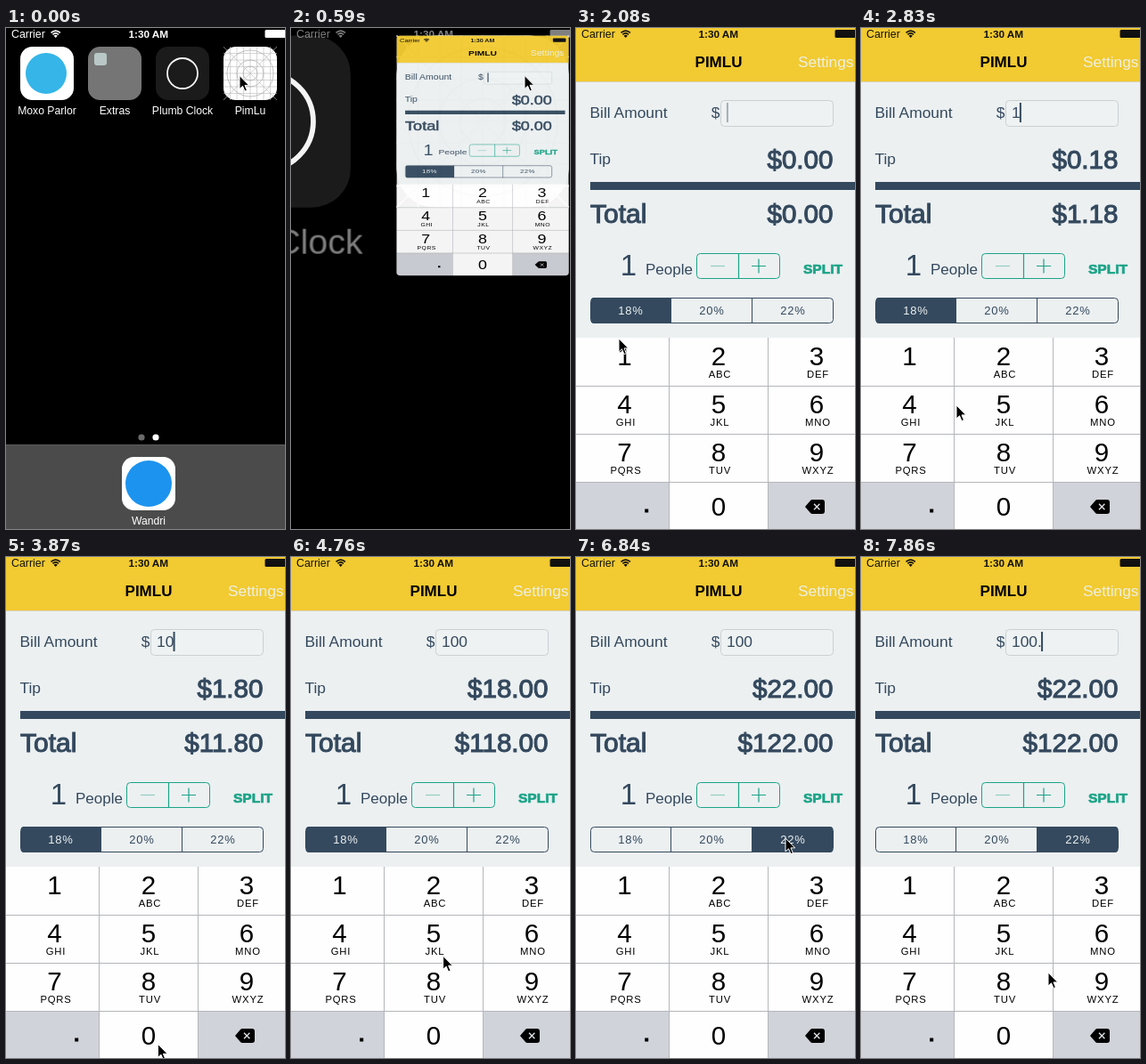
An HTML page that plays this animation: 313 by 563 pixels, repeating every 8 s.

```html
<!DOCTYPE html>
<html lang="en">
<head>
<meta charset="utf-8">
<title>Tip calculator</title>
<style>
  html, body { margin: 0; width: 100%; height: 100%; overflow: hidden; background: #000; }
  svg { display: block; width: 313px; height: 563px; font-family: "Liberation Sans", Arial, sans-serif; }
  text { white-space: pre; }
</style>
</head>
<body>
<svg id="stage" viewBox="0 0 313 563" xmlns="http://www.w3.org/2000/svg"></svg>
<script>
const LOOP = 8000, START = 440, TICK = 148.4;
const NAVY = '#34495e', TEAL = '#1ba387', PAPER = '#ecf0f1';
const APP = 'PimLu';
// The phone screen is slightly larger than the stage that crops it.
const SCREEN = { top: -4.5, w: 320, h: 568 };

// ---- drawing helpers ----
const attrs = o => Object.entries(o).map(([k, v]) => ` ${k}="${v}"`).join('');
const text = (x, y, size, s, o = {}) => `<text x="${x}" y="${y}" font-size="${size}"${attrs(o)}>${s}</text>`;
const centered = (x, y, size, s, o = {}) => text(x, y, size, s, { 'text-anchor': 'middle', ...o });
const rect = (x, y, w, h, fill, o = {}) =>
  `<rect x="${x}" y="${y}" width="${w}" height="${h}" fill="${fill}"${attrs(o)}/>`;
const circle = (x, y, r, fill, o = {}) => `<circle cx="${x}" cy="${y}" r="${r}" fill="${fill}"${attrs(o)}/>`;
const line = (d, stroke, width = 1, o = {}) =>
  `<path d="${d}" fill="none" stroke="${stroke}" stroke-width="${width}"${attrs(o)}/>`;

const statusBar = color => `<g fill="${color}">
  ${text(6, 11, 12.4, 'Carrier')}
  ${line('M50.5 5.4Q55.7 0.8 60.9 5.4M52.4 7.4Q55.7 4.4 59 7.4', color, 1.6)}
  <path d="M53.6 8.7Q55.7 7 57.8 8.7L55.7 11z"/>
  ${centered(159.8, 11, 11.8, '1:30 AM', { 'font-weight': 'bold' })}
  ${rect(290.5, 2, 24, 9, color, { rx: 1.5 })}</g>`;

// ---- home screen ----
const tile = (x, y, fill) => rect(x, y, 60, 60, fill, { rx: 13.5 });
const label = (x, y, s, o = {}) => centered(x, y, 12.2, s, { fill: '#fff', ...o });

function gridIcon() {
  let d = 'M244 21L304 81M304 21L244 81';
  for (let i = 1; i < 8; i++) d += `M${244 + i * 7.5} 21v60M244 ${21 + i * 7.5}h60`;
  const rings = [8, 15, 26].map(r => circle(274, 51, r, 'none', { stroke: '#aaa', 'stroke-width': 0.7 }));
  return line(d, '#bbb', 0.6) + rings.join('');
}

const homeScreen = `
  ${tile(16, 21, '#fff')}${circle(45, 51, 23, '#35b5e8')}
  ${tile(92, 21, '#757575')}${rect(99, 28, 14, 14, '#b9c8c6', { rx: 3 })}
  ${tile(168, 21, '#1b1b1b')}${circle(198, 51, 17, 'none', { stroke: '#f4f4f4', 'stroke-width': 1.8 })}
  ${tile(244, 21, '#fff')}${gridIcon()}
  ${circle(152, 460, 3.6, '#6b6b6b')}${circle(168, 460, 3.6, '#fff')}
  ${rect(0, 468, 313, 95, '#4b4b4b')}${line('M0 468.5H313', '#5c5c5c')}
  ${tile(130, 482, '#fff')}${circle(160, 512, 26, '#1c93ee')}
  <g id="labels">${label(46, 97, 'Moxo Parlor')}${label(122, 97, 'Extras')}${label(198, 97, 'Plumb Clock')}
  ${label(274, 97, APP, { id: 'appLabel' })}${label(160, 558, 'Wandri')}</g>`;

// ---- calculator ----
const COLUMNS = [{ x: 0, w: 104, mid: 54.5 }, { x: 105, w: 110, mid: 160 }, { x: 216, w: 104, mid: 270 }];
const LETTERS = ['', 'ABC', 'DEF', 'GHI', 'JKL', 'MNO', 'PQRS', 'TUV', 'WXYZ'];
const SEGMENTS = [{ x: 17, w: 90, mid: 61.4 }, { x: 107, w: 90.5, mid: 152.4 }, { x: 197.5, w: 90.5, mid: 243.4 }];
const RATES = [18, 20, 22];

function keypad() {
  let out = rect(0, 348, SCREEN.w, 216, '#fefefe');
  const back = (id, col, row, fill) =>
    rect(COLUMNS[col].x, 348 + row * 54, COLUMNS[col].w, 54, fill, { id: 'key' + id });
  LETTERS.forEach((letters, i) => {
    const col = i % 3, row = (i - col) / 3, { mid } = COLUMNS[col];
    out += back(i + 1, col, row, '#fefefe')
      + centered(mid, 378.5 + row * 54, 29.5, i + 1)
      + centered(mid + 1.5, 393 + row * 54, 11.3, letters, { 'letter-spacing': 0.8 });
  });
  out += back('Dot', 0, 3, '#d0d3d9') + rect(77.2, 540.5, 4, 4, '#000')
    + back(0, 1, 3, '#fefefe') + centered(160, 547.5, 29.5, '0')
    + back('Del', 2, 3, '#d0d3d9')
    + '<path d="M257 538l6-7q1-1 2-1h11q3 0 3 3v10q0 3-3 3h-11q-1 0-2-1z"/>'
    + line('M267 534.8l6.4 6.4m0-6.4l-6.4 6.4', '#e4e6ea', 1.3);
  return out + line('M0 402.5H320M0 456.5H320M0 510.5H320M104.5 348V564M215.5 348V564', '#b4b6ba');
}

const medium = { stroke: NAVY, 'stroke-width': 1.1 };
const amount = { 'text-anchor': 'end', fill: NAVY, ...medium };
const calculator = `
  ${rect(0, SCREEN.top, SCREEN.w, SCREEN.h, PAPER)}
  ${rect(0, SCREEN.top, SCREEN.w, 60 - SCREEN.top, '#f2ca31')}${line('M0 60.5H320', '#d9d3b4')}
  ${statusBar('#111')}
  ${centered(160, 44, 17, APP.toUpperCase(), { 'font-weight': 'bold' })}
  ${text(249, 44, 17.3, 'Settings', { fill: '#ecf0e4' })}
  <g fill="${NAVY}">
    ${text(15.5, 100.5, 17.4, 'Bill Amount')}${text(151.8, 100.5, 17.4, '$')}
    ${rect(162.5, 81.5, 126, 29, '#eef2f2', { rx: 4, stroke: '#cbd0d2' })}
    ${text(169, 101, 17.4, '', { id: 'entry' })}
    ${rect(0, 84, 2, 22, NAVY, { id: 'caret' })}
    ${text(15.5, 152.5, 17.4, 'Tip')}
    ${text(288.5, 158, 29.6, '', { id: 'tip', ...amount })}
    ${rect(16, 173, 297, 9, NAVY)}
    ${text(16, 219, 30, 'Total', medium)}
    ${text(288.5, 219, 29.6, '', { id: 'total', ...amount })}
    ${centered(59, 278, 33, '1')}${text(78, 277, 17, 'People')}
  </g>
  ${rect(135.5, 253.5, 93, 28, 'none', { rx: 4, stroke: TEAL })}
  ${line('M182.5 253V282M197 267.5h16m-8-8v16', TEAL, 1.2)}${line('M151 267.5h16', '#93cdc1', 1.2)}
  ${text(255, 276, 15.5, 'SPLIT', { 'font-weight': 'bold', fill: TEAL, stroke: TEAL, 'stroke-width': 0.7 })}
  <clipPath id="pill">${rect(16, 303, 273, 29, '#000', { rx: 4.5 })}</clipPath>
  <g clip-path="url(#pill)">${SEGMENTS.map((s, i) => rect(s.x, 303, s.w, 29, 'none', { id: 'seg' + i })).join('')}</g>
  ${rect(16.5, 303.5, 272, 28, 'none', { rx: 4, stroke: NAVY })}
  ${line('M106.5 303V332M197.5 303V332', NAVY)}
  ${SEGMENTS.map((s, i) => centered(s.mid, 322, 13, RATES[i] + '%', { id: 'rate' + i, 'letter-spacing': 0.7 })).join('')}
  ${keypad()}`;

document.getElementById('stage').innerHTML = `
  <g id="home">${homeScreen}</g><g id="homeStatus">${statusBar('#fff')}</g>
  <clipPath id="frame">${rect(0, SCREEN.top, SCREEN.w, SCREEN.h, '#000', { id: 'frameShape' })}</clipPath>
  <g id="app" clip-path="url(#frame)">${calculator}</g>
  <path id="cursor" d="M0 0V15L3.5 11.8L6 17.6L8.4 16.6L6 10.9H10.7Z" fill="#000" stroke="#fff" stroke-width="1"/>`;

// ---- timeline, counted in ticks ----
// Left, top, horizontal and vertical scale of the opening screen.
const CLOSED = [244, 21, 60 / SCREEN.w, 60 / SCREEN.h];
const OPENING = [[238, 20, 0.21, 0.12], [118.4, 8.4, 0.604, 0.475], [33, -1, 0.892, 0.855], [1, -4.2, 0.997, 0.995]];
const OPEN = [0, SCREEN.top, 1, 1];
const PATH = [
  [0, 262, 53.5], [4, 262, 53], [5, 255, 62], [6, 228, 100], [8, 125, 245], [10, 55, 343], [11, 48, 349],
  [15, 48, 352], [16, 107, 424], [17, 107, 424], [19, 153, 512], [21, 170, 547], [26, 171, 548],
  [28, 177, 505], [31, 158, 335], [32, 154, 314], [35, 154, 313], [36, 167, 315], [38, 235, 316],
  [43, 235, 316], [44, 205, 365], [46, 80, 530], [48, 80, 533], [49, 192, 479], [50, 210, 467]
];
const ENTRIES = [[-9, ''], [15, '1'], [23, '10'], [25, '100'], [48, '100.']];
const CHOICES = [[-9, 0], [34, 1], [43, 2]];
const PRESSES = { 14: 'key1', 22: 'key0', 24: 'key0', 33: 'seg1', 42: 'seg2', 47: 'keyDot' };

const $ = id => document.getElementById(id);
const set = (id, o) => { for (const k in o) $(id).setAttribute(k, o[k]); };
const clamp = v => Math.max(0, Math.min(1, v));
const latest = (list, k) => list.filter(e => e[0] <= k).pop();

function cursorAt(k) {
  const i = PATH.findIndex(p => p[0] >= k);
  if (i <= 0) return PATH[0].slice(1);
  const a = PATH[i - 1], b = PATH[i], u = (k - a[0]) / (b[0] - a[0]);
  return [1, 2].map(n => a[n] + (b[n] - a[n]) * u);
}

function caretOpacity(k, since) {
  const phase = (k - Math.max(since, 1)) * TICK % 1000;
  return phase < 780 ? clamp(1 - (phase - 400) / 140) : clamp((phase - 780) / 120);
}

function drawLaunch(k) {
  const launched = k >= 0;
  const [x, y, sx, sy] = launched ? OPENING[k] || OPEN : CLOSED;
  const zoom = sx / CLOSED[2], dim = launched ? [0.9, 0.5, 0.15][k] || 0 : 1;
  set('home', {
    transform: `translate(${x - CLOSED[0] * zoom} ${y - CLOSED[1] * zoom}) scale(${zoom})`,
    opacity: k < 3 ? 1 : 0
  });
  set('labels', { opacity: dim });
  set('appLabel', { opacity: launched ? 0 : 1 });
  set('homeStatus', { opacity: dim });
  set('frameShape', { rx: 18 * (1 - sx) });
  set('app', {
    transform: `translate(${x} ${y - SCREEN.top * sy}) scale(${sx} ${sy})`,
    opacity: launched ? [0.25, 0.96][k] || 1 : 0
  });
}

function drawCalculator(k) {
  const [since, entry] = latest(ENTRIES, k), choice = latest(CHOICES, k)[1], pressed = PRESSES[k];
  const bill = Number(entry), tip = bill * RATES[choice] / 100;
  $('entry').textContent = entry;
  $('tip').textContent = '$' + tip.toFixed(2);
  $('total').textContent = '$' + (bill + tip).toFixed(2);
  const width = [...entry].reduce((sum, c) => sum + (c === '.' ? 0.278 : 0.556), 0) * 17.4;
  set('caret', { x: 168.9 + width - (entry ? 0.7 : 0), opacity: caretOpacity(k, since) });
  RATES.forEach((_, i) => {
    set('seg' + i, { fill: i === choice ? NAVY : pressed === 'seg' + i ? '#c9d0d5' : PAPER });
    set('rate' + i, { fill: i === choice ? PAPER : NAVY });
  });
  for (const id of ['key1', 'key0']) set(id, { fill: pressed === id ? '#d0d3d9' : '#fefefe' });
  set('keyDot', { fill: pressed === 'keyDot' ? '#fefefe' : '#d0d3d9' });
}

function draw(t) {
  const k = Math.min(50, Math.floor((t - START + 2) / TICK));
  drawLaunch(k);
  drawCalculator(k);
  set('cursor', { transform: `translate(${cursorAt(k)})` });
}

function loop() {
  draw(performance.now() % LOOP);
  requestAnimationFrame(loop);
}
loop();
</script>
</body>
</html>
```
